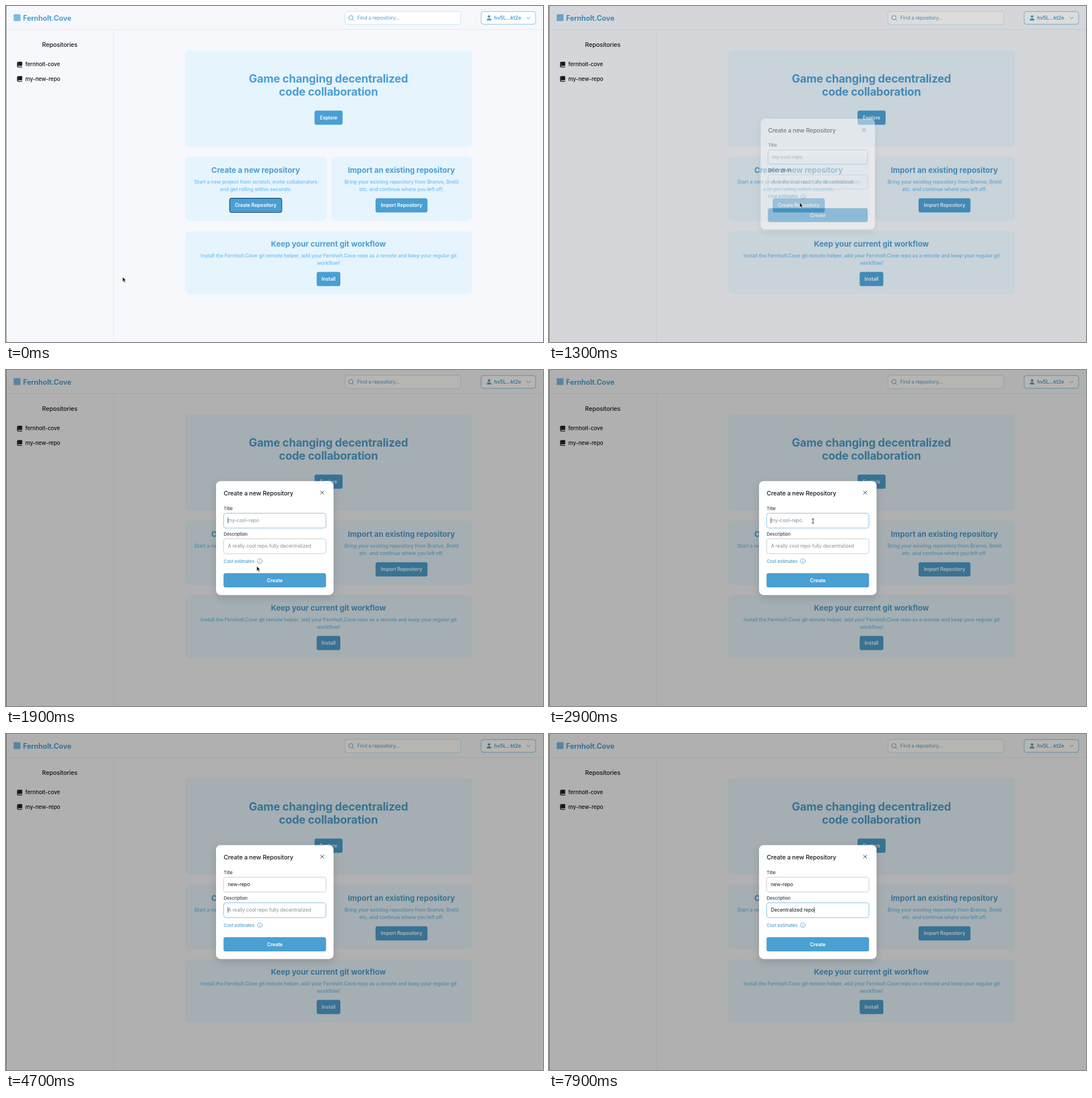
An HTML page for the animation above (8 s loop, 946x592 px).

```html
<!DOCTYPE html>
<html lang="en">
<head>
<meta charset="utf-8">
<title>Create a repository</title>
<style>
  html, body { margin: 0; width: 100%; height: 100%; overflow: hidden; background: #f6f8fc; }
  svg { display: block; width: 100%; height: 100%; }
  text { font: 8.7px Inter, "Liberation Sans", sans-serif; letter-spacing: -.01em; white-space: pre; fill: #15181e; }
  .mid text, text.mid { text-anchor: middle; }
  .card { fill: #e6f4fe; }
  .btn { fill: #4a9fd3; }
  .line { fill: none; stroke-linecap: round; stroke-linejoin: round; }
  .blue { stroke: #4a9fd3; }
  text.hero { font-size: 19.6px; font-weight: 700; letter-spacing: -.01em; fill: #4a9fd3; }
  text.head { font-size: 13.4px; font-weight: 700; letter-spacing: 0; fill: #4a9fd3; }
  text.sub { font-size: 8.85px; font-weight: 500; fill: #6cbff3; }
  text.on { font-size: 8.6px; font-weight: 600; fill: #fff; }
  text.side { font-size: 9.6px; font-weight: 500; }
  text.title { font-size: 10.7px; font-weight: 500; }
  text.label { font-size: 7.8px; font-weight: 500; fill: #374151; }
  .field { fill: #fff; filter: drop-shadow(0 .7px .8px #0002); }
</style>
</head>
<body>
<svg viewBox="0 0 946 592">
  <defs>
    <g id="book">
      <path d="M2 0h7v7.3H2.1a.7.7 0 0 0 0 1.5H9V10H2a2 2 0 0 1-2-2V2a2 2 0 0 1 2-2z" fill="#15181e"/>
      <path d="M2.2 1v5.5" stroke="#777" stroke-width=".5"/>
    </g>
  </defs>
  <rect width="946" height="592" fill="#f6f8fc"/>
  <path d="M0 41.5H946M189.5 42V592" stroke="#e5e9f1"/>
  <path d="M.5 0V592" stroke="#8d9196"/>

  <!-- header -->
  <rect x="13.5" y="14.5" width="12" height="12" fill="#74bce8"/>
  <text x="30" y="25.5" style="font-size:12.6px;font-weight:700;fill:#4a9fd3">Fernholt.Cove</text>
  <rect x="597" y="9.5" width="204" height="23.2" rx="4" fill="#fff" stroke="#c3e4f9"/>
  <path class="line blue" d="M610.5 23.6l2.2 2.2M604 20.6a3.7 3.7 0 1 0 7.4 0a3.7 3.7 0 1 0-7.4 0"/>
  <text x="618.8" y="24" style="fill:#4a9fd3">Find a repository...</text>
  <rect x="837" y="9.8" width="96" height="22.4" rx="4" fill="#fff" stroke="#7cc1ea"/>
  <circle cx="851" cy="18.6" r="2.3" fill="#4a9fd3"/>
  <path d="M847 25.5v-1a2.6 2.6 0 0 1 2.6-2.6h2.8a2.6 2.6 0 0 1 2.6 2.6v1z" fill="#4a9fd3"/>
  <text x="860" y="24.2" style="font-size:8.9px;font-weight:600;fill:#4a9fd3">hv5L...kt2e</text>
  <path class="line blue" d="M917.6 19.7l2.9 2.9 2.9-2.9"/>

  <!-- sidebar -->
  <text class="title mid" x="94.7" y="72">Repositories</text>
  <use href="#book" x="19.5" y="98.3"/>
  <text class="side" x="34" y="106.3">fernholt-cove</text>
  <use href="#book" x="19.5" y="123.5"/>
  <text class="side" x="34" y="131.8">my-new-repo</text>

  <!-- cards -->
  <g class="card">
    <rect x="315.8" y="78.3" width="505.2" height="169.7" rx="7"/>
    <rect x="315.8" y="265.5" width="249.2" height="113" rx="7"/>
    <rect x="573.5" y="265.5" width="247.5" height="113" rx="7"/>
    <rect x="315.8" y="397" width="505.2" height="110.4" rx="7"/>
  </g>
  <g class="btn">
    <rect x="543.5" y="184.3" width="49.5" height="24.9" rx="3.5"/>
    <rect id="create" x="394" y="338.7" width="91.8" height="25" rx="3.5" stroke-width="1.2"/>
    <rect x="651" y="338.7" width="91.5" height="25" rx="3.5"/>
    <rect x="547.3" y="468.6" width="41.7" height="24.9" rx="3.5"/>
  </g>
  <g class="mid">
    <text class="hero" x="568" y="135">Game changing decentralized</text>
    <text class="hero" x="568" y="157.6">code collaboration</text>
    <text class="on" x="568.2" y="200">Explore</text>
    <text class="head" x="439.8" y="294.2">Create a new repository</text>
    <text class="sub" x="440" y="312.8">Start a new project from scratch, invite collaborators</text>
    <text class="sub" x="440" y="326.3">and get rolling within seconds.</text>
    <text class="on" x="439.8" y="354.4">Create Repository</text>
    <text class="head" x="696.5" y="294.2">Import an existing repository</text>
    <text class="sub" x="696.6" y="312.8">Bring your existing repository from Branvo, Bretil</text>
    <text class="sub" x="696.6" y="326.3">etc. and continue where you left off.</text>
    <text class="on" x="696.7" y="354.4">Import Repository</text>
    <text class="head" x="568" y="424.1">Keep your current git workflow</text>
    <text class="sub" x="568.4" y="442.7">Install the Fernholt.Cove git remote helper, add your Fernholt.Cove repo as a remote and keep your regular git</text>
    <text class="sub" x="568.2" y="456.2">workflow!</text>
    <text class="on" x="568.2" y="484.2">Install</text>
  </g>

  <rect id="shade" width="946" height="592" fill="#100c00"/>

  <!-- dialog -->
  <g id="modal">
    <rect x="370" y="195.7" width="207" height="200.7" rx="8" fill="#fff" style="filter:drop-shadow(0 5px 7px #0002)"/>
    <text class="title" x="383.5" y="220.7">Create a new Repository</text>
    <path class="line" d="M554 213l6 6m0-6l-6 6" stroke="#30353d" stroke-width=".9"/>
    <text class="label" x="383.5" y="246.8">Title</text>
    <rect class="field" x="383.5" y="252.5" width="180" height="25.8" rx="4"/>
    <text class="entry" x="390.8" y="268.3"></text>
    <text class="label" x="383.5" y="291.9">Description</text>
    <rect class="field" x="383.5" y="297.5" width="180" height="25.8" rx="4"/>
    <text class="entry" x="390.8" y="313.3"></text>
    <text class="label" x="383.5" y="339.5" style="fill:#4a9fd3">Cost estimates</text>
    <circle class="line blue" cx="447.2" cy="336.8" r="4.1" stroke-width=".8"/>
    <path class="line blue" d="M447.2 336.4v2.2M447.2 334.7v.1" stroke-width=".9"/>
    <rect class="btn" x="383.2" y="358" width="180.6" height="25" rx="3.5"/>
    <text class="on mid" x="473.6" y="373.9" style="font-size:8.8px">Create</text>
    <path id="caret" stroke="#222" stroke-width=".8"/>
  </g>

  <!-- pointers -->
  <g id="pointer">
    <path d="M0 0v8.8l2-1.9 1.5 3.3 1.6-.7-1.5-3.2h2.7z" fill="#111" stroke="#fff" stroke-width=".7"/>
    <path d="M-1.5-3.8c0-1 1.5-1 1.5 0v3c.4-.7 1.3-.5 1.4.1.5-.6 1.3-.4 1.4.2.6-.4 1.3 0 1.2.8 0 1.7-.3 2.3-.9 4.2h-4.2c-.6-1.7-1.8-2.7-2.4-4-.3-.9.8-1.4 1.4-.6l.6.7z" fill="#fff" stroke="#111" stroke-width=".7"/>
    <path class="line" d="M-1.7-4Q0-4 0-2.7Q0-4 1.7-4M0-3V3M-1.7 4Q0 4 0 2.7Q0 4 1.7 4" stroke="#222" stroke-width=".9"/>
  </g>
</svg>
<script>
const LOOP = 8000, TICK = 100;
const $ = id => document.getElementById(id);
const fields = document.querySelectorAll('.field');
const entries = document.querySelectorAll('.entry');
const [arrow, hand, beam] = $('pointer').children;
const hints = ['my-cool-repo', 'A really cool repo fully decentralized'];

const clamp = x => Math.max(0, Math.min(1, x));
const part = (t, from, to) => clamp((t - from) / (to - from));
const smooth = x => x * x * (3 - 2 * x);
const typed = (text, t, start, step) => text.slice(0, Math.max(0, Math.floor((t - start) / step) + 1));
const show = (el, on) => el.setAttribute('visibility', on ? 'visible' : 'hidden');

function drawPointer(t) {
  const a = smooth(part(t, 100, 950)), b = smooth(part(t, 1850, 2700));
  const x = 205.3 + 236.2 * a + 23.5 * b;
  const y = 477.3 - 131 * a - 80.3 * b;
  const over = t >= 900 && t < 1300, inField = t >= 1300 && y < 278.5;
  $('pointer').setAttribute('transform', `translate(${over ? x + 1 : x} ${over ? y + 5.5 : y})`);
  const seen = t < 3000;
  show(arrow, seen && !over && !inField);
  show(hand, seen && over);
  show(beam, seen && inField);
}

function drawForm(t) {
  const values = [typed('new-repo', t, 3050, 150), typed('Decentralized repo', t, 5900, 105)];
  const focus = t < 4500 ? 0 : 1;
  entries.forEach((el, i) => {
    el.textContent = values[i] || hints[i];
    el.style.fill = values[i] ? '#15181e' : '#8a9099';
    fields[i].setAttribute('stroke', i === focus ? '#86cdef' : '#d2d6dc');
  });
  const x = 391 + (values[focus] ? entries[focus].getComputedTextLength() : 0);
  $('caret').setAttribute('d', `M${x} ${260 + 45 * focus}v10`);
  const blinkOff = t < 2900 ? Math.floor((t - 1400) / 500) % 2 === 0 : t >= 5100 && t < 5500;
  $('caret').setAttribute('opacity', t < 1400 || blinkOff ? 0 : 1);
}

function draw(t) {
  const open = 1 - (1 - part(t, 1240, 1540)) ** 2.8;
  $('create').style.fill = t >= 900 && t < 1300 ? '#3d8cbc' : '';
  $('create').setAttribute('stroke', t < 1300 ? '#174a6b' : 'none');
  $('shade').setAttribute('opacity', .3 * open);
  $('modal').setAttribute('opacity', open);
  $('modal').setAttribute('transform', `translate(473.5 296) scale(${.95 + .05 * open}) translate(-473.5 -296)`);
  drawForm(t);
  drawPointer(t);
}

const begin = performance.now();
function frame() {
  const t = (performance.now() - begin) % LOOP;
  draw(Math.floor(t / TICK) * TICK);
  requestAnimationFrame(frame);
}
frame();
</script>
</body>
</html>
```
